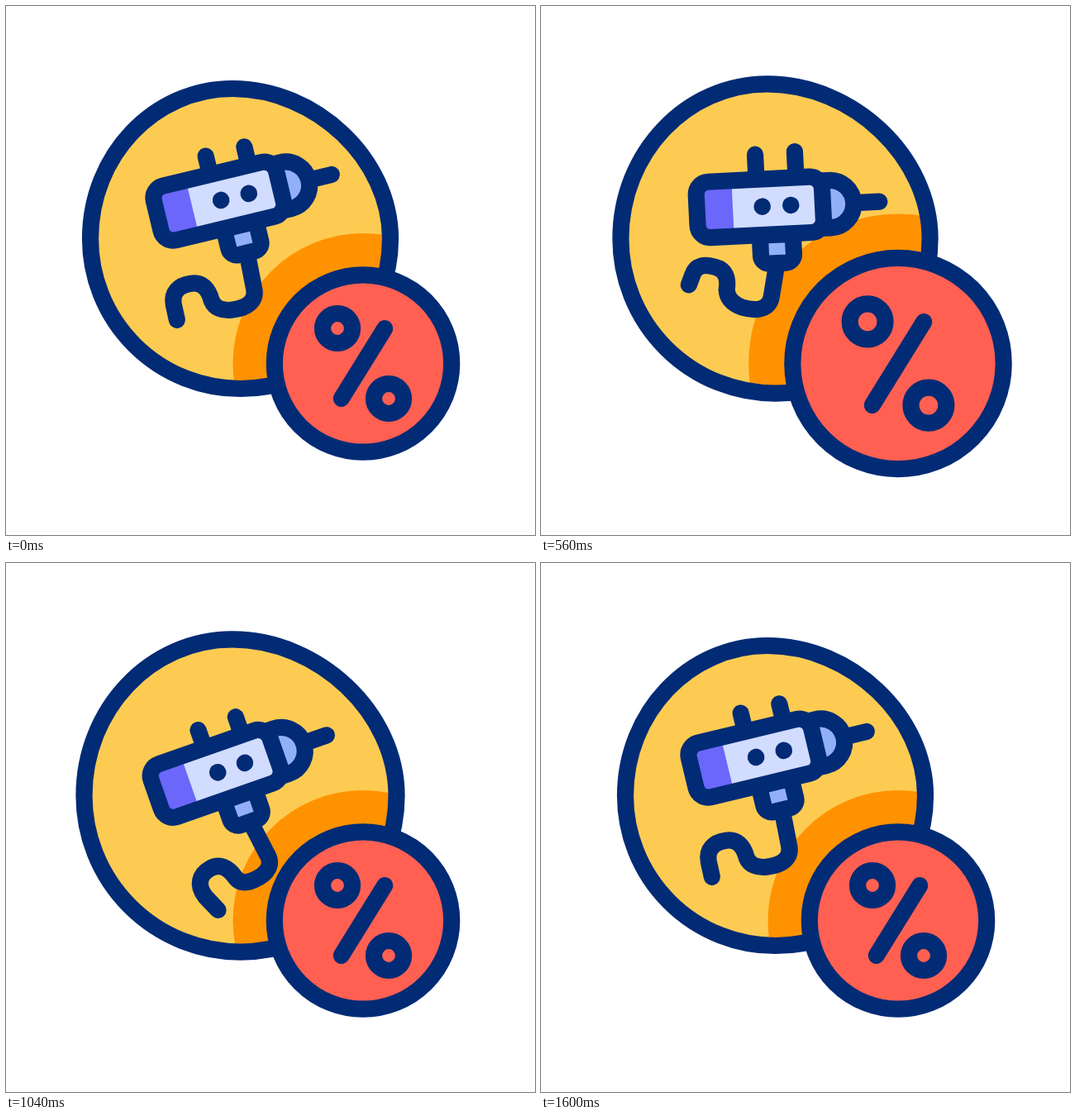
Write an HTML page with a canvas that moves like this. It is 640x640 px and loops after 1720 ms.

```html
<!DOCTYPE html>
<html lang="en">
<head>
<meta charset="utf-8">
<title>Drill discount</title>
<style>
  html, body { margin: 0; width: 100%; height: 100%; overflow: hidden; background: #fff; }
  canvas { display: block; width: 640px; height: 640px; }
</style>
</head>
<body>
<canvas id="stage" width="640" height="640"></canvas>
<script>
const ctx = document.getElementById('stage').getContext('2d');
const LOOP = 1720, MOVE_END = 1600, REST_TILT = 13.5;
const NAVY = '#022b75', YELLOW = '#fdcb52', ORANGE = '#ff9200', RED = '#ff6052',
      PURPLE = '#6b67fa', PALE = '#d2dcff', BLUE = '#92b0f8';

// Cable control points around its joint: x, y, share of the swing
const CABLE = [
  [5, 18, .3], [13, 59, .5],
  [17, 75, .55], [5, 84, .6], [-14, 86, .65],
  [-25, 87, .7], [-34, 84, .75], [-38, 75, .8],
  [-42, 60, .8], [-50, 52, .8], [-63, 54, .8],
  [-78, 56, .82], [-87, 65, .88], [-84, 80, .95],
  [-80, 98, 1.08]
];

const rad = deg => deg * Math.PI / 180;

// Eased value at time t from alternating times and values
function ease(t, ...keys) {
  if (t <= keys[0]) return keys[1];
  for (let i = 2; i < keys.length; i += 2) {
    if (t < keys[i]) {
      const p = (t - keys[i - 2]) / (keys[i] - keys[i - 2]);
      return keys[i - 1] + (keys[i + 1] - keys[i - 1]) * p * p * (3 - 2 * p);
    }
  }
  return keys[keys.length - 1];
}

function paint(fill, outlined = true) {
  if (fill) {
    ctx.fillStyle = fill;
    ctx.fill();
  }
  if (outlined) ctx.stroke();
}

function circle(x, y, r, fill, outlined) {
  ctx.beginPath();
  ctx.arc(x, y, r, 0, 2 * Math.PI);
  paint(fill, outlined);
}

function box(x, y, w, h, radii, fill, outlined) {
  ctx.beginPath();
  ctx.roundRect(x, y, w, h, radii);
  paint(fill, outlined);
}

function line(x1, y1, x2, y2) {
  ctx.beginPath();
  ctx.moveTo(x1, y1);
  ctx.lineTo(x2, y2);
  ctx.stroke();
}

// Round below, slightly flattened at the upper right
function discPath(r) {
  const path = new Path2D(), cx = 283.5, cy = 281.5, x = f => cx + r * f, y = f => cy + r * f;
  path.arc(cx, cy, r, 0, Math.PI);
  path.bezierCurveTo(x(-1), y(-.554), x(-.576), y(-1), x(-.052), y(-1));
  path.bezierCurveTo(x(.504), y(-1), x(1), y(-.529), x(1), y(0));
  path.closePath();
  return path;
}

function drawDisc(t, lift) {
  const disc = discPath(181.5 + 9.6 * lift);
  const shade = 157.5 + ease(t, 50, 0, 452, 28.4, 856, 0);
  ctx.fillStyle = YELLOW;
  ctx.fill(disc);
  ctx.save();
  ctx.clip(disc);
  circle(432, 432.5, shade, ORANGE, false);
  ctx.restore();
  ctx.stroke(disc);
}

function drawCable(t) {
  const swing = ease(t, 200, 0, 600, -17, 1000, 18, MOVE_END, 0);
  const pts = CABLE.map(([x, y, share]) => {
    const a = rad(swing * share), c = Math.cos(a), s = Math.sin(a);
    const pull = 1 + .005 * share * Math.min(swing, 0);
    return [(x * c + y * s) * pull, (y * c - x * s) * pull];
  });
  ctx.save();
  ctx.translate(0, 8);
  ctx.rotate(rad(REST_TILT));
  ctx.beginPath();
  ctx.moveTo(...pts[0]);
  ctx.lineTo(...pts[1]);
  for (let i = 2; i < 14; i += 3) ctx.bezierCurveTo(...pts[i], ...pts[i + 1], ...pts[i + 2]);
  ctx.lineTo(...pts[14]);
  ctx.stroke();
  ctx.restore();
}

function drawDrill(t, lift) {
  const tilt = ease(t, 40, REST_TILT, 485, 1, 880, 21, 1400, REST_TILT);
  const pinA = ease(t, 60, 0, 460, 9, 800, 0);
  const pinB = ease(t, 240, 0, 620, 9, 1000, 0);
  const bit = ease(t, 0, 0, 200, 4.5, 880, 4.5, 1160, 0);
  const nose = 63 + .35 * bit;

  ctx.save();
  ctx.translate(285, 274 + 20 * lift);
  ctx.rotate(rad(-tilt));
  drawCable(t);
  ctx.translate(2.2, -44);

  line(-22.8, -35, -22.8, -56 - pinA);
  line(25.2, -35, 25.2, -56 - pinB);
  line(90, 1.3, 120 + bit, 1.3);
  box(-22, 35, 40, 34.5, [0, 0, 10, 10], BLUE);

  ctx.beginPath();
  ctx.moveTo(56, -27.4);
  ctx.lineTo(nose, -27.4);
  ctx.arc(nose, 1.3, 28.7, -Math.PI / 2, Math.PI / 2);
  ctx.lineTo(56, 30);
  paint(BLUE);

  box(-96.5, -33, 152.5, 67.5, 15, PALE, false);
  box(-96.5, -33, 43.5, 67.5, [15, 0, 0, 15], PURPLE, false);
  box(-96.5, -33, 152.5, 67.5, 15);
  for (const x of [-17.3, 17.3]) circle(x, .2, 10.3, NAVY, false);
  ctx.restore();
}

function drawBadge(t) {
  const s = 1 + ease(t, 68, 0, 480, .212, 892, 0);
  ctx.save();
  ctx.translate(432, 432.5);
  circle(0, 0, 107.2 * s, RED);
  for (const side of [-1, 1]) circle(31 * s * side, 42.5 * s * side, 18 * s);
  line(26.2 * s, -42.3 * s, -26.2 * s, 42.3 * s);
  ctx.restore();
}

function draw(now) {
  const t = Math.min(now % LOOP, MOVE_END);
  const lift = ease(t, 260, 0, 800, 1, MOVE_END, 0);
  ctx.clearRect(0, 0, 640, 640);
  ctx.strokeStyle = NAVY;
  ctx.lineWidth = 20.2;
  ctx.lineCap = 'round';
  ctx.lineJoin = 'round';
  drawDisc(t, lift);
  drawDrill(t, lift);
  drawBadge(t);
}

let start;
function tick(now) {
  start ??= now;
  draw(now - start);
  requestAnimationFrame(tick);
}
draw(0);
requestAnimationFrame(tick);
</script>
</body>
</html>
```
